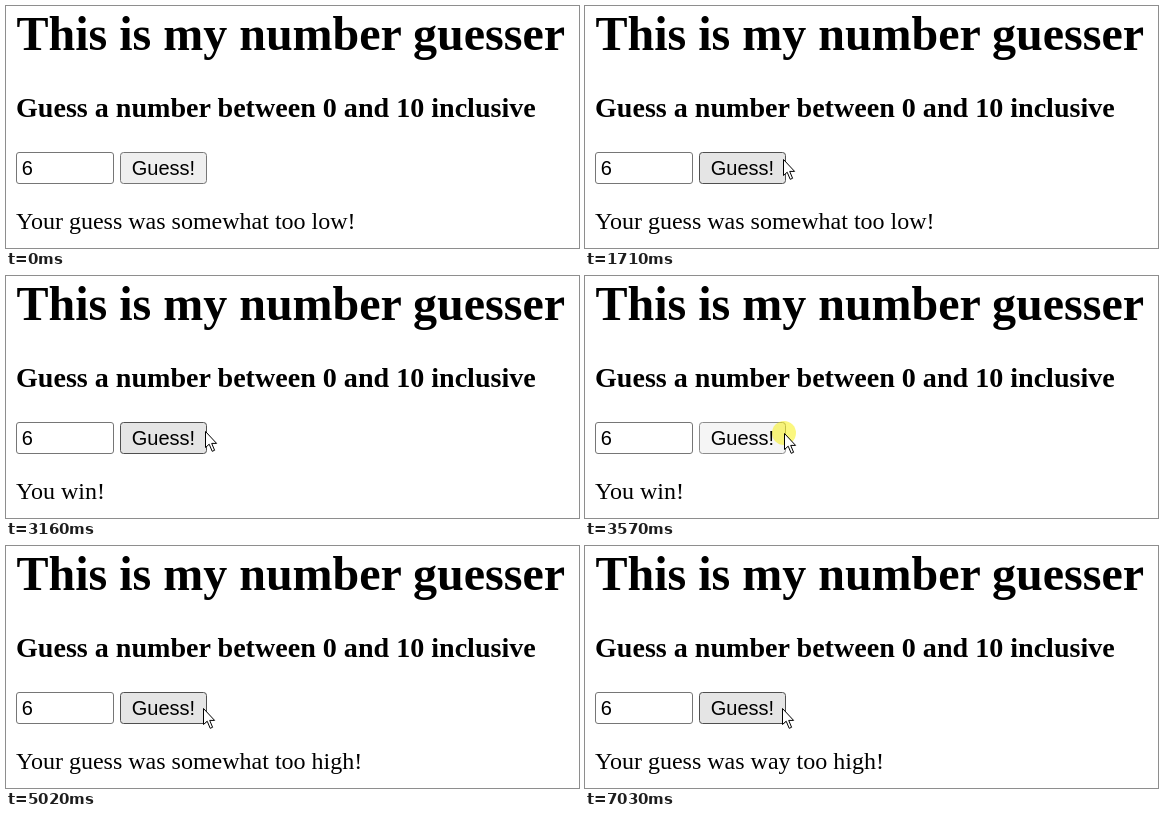
An HTML page for the animation above (8 s loop, 573 by 242 pixels).

```html
<!DOCTYPE html>
<html lang="en">
<head>
<meta charset="utf-8">
<title>Number guesser</title>
<style>
  html, body { margin: 0; width: 573px; height: 242px; overflow: hidden; background: #fff; }
  svg { display: block; }
  text { font-family: "Liberation Serif", "Times New Roman", serif; }
  .bold { font-weight: bold; }
  .ui { font: 20px "Liberation Sans", Arial, sans-serif; }
  #button { fill: #efefef; stroke: #767676; }
  #button.hover { fill: #e5e5e5; stroke: #4f4f4f; }
  #button.pressed { fill: #f5f5f5; stroke: #8d8d8d; }
</style>
</head>
<body>
<svg width="573" height="242">
  <text class="bold" x="10.5" y="44" font-size="48">This is my number guesser</text>
  <text class="bold" x="10" y="111" font-size="28.08">Guess a number between 0 and 10 inclusive</text>
  <rect x="10.5" y="146.5" width="97" height="31" rx="2.5" fill="#fff" stroke="#767676"/>
  <text class="ui" x="15.7" y="169">6</text>
  <rect id="button" x="114.5" y="146.5" width="86" height="31" rx="3"/>
  <text class="ui" x="157.5" y="169" text-anchor="middle">Guess!</text>
  <text id="message" x="10" y="223" font-size="24"></text>
  <g id="pointer">
    <circle id="halo" r="12" fill="#f8f000" fill-opacity=".5"/>
    <path d="M.5 .5V16.5L4.2 13.2L7.2 20.3L9.6 19.3L6.7 12.4H11.6Z" fill="#fff" stroke="#000"/>
  </g>
</svg>
<script>
const LOOP = 8000;
const STEP = 132; // the picture advances in ticks of this many ms
const LEAD = 8;
const $ = id => document.getElementById(id);

// Pointer stops: [tick, x, y].
const path = [
  [3, 496, 195], [8, 199, 155], [13, 198, 153], [23, 198, 153],
  [26, 199, 157], [32, 199, 157], [33, 197, 162]
];
const clicks = [15, 27, 37, 45];
const verdict = text => `Your guess was ${text}!`;
const messages = [
  [0, verdict("somewhat too low")],
  [16, "You win!"],
  [28, verdict("somewhat too high")],
  [46, verdict("somewhat too low")],
  [53, verdict("way too high")]
];

const easeOut = p => 1 - (1 - p) ** 2;

function pointerAt(tick) {
  const i = path.findLastIndex(([start]) => start <= tick);
  if (i < 0) return null;
  const [start, ...from] = path[i];
  const [end, ...to] = path[i + 1] ?? [Infinity, ...from];
  const k = easeOut((tick - start) / (end - start));
  return from.map((v, axis) => Math.round(v + (to[axis] - v) * k));
}

function draw(t) {
  const tick = Math.floor((t + LEAD) / STEP);
  const tip = pointerAt(tick);
  const clicking = clicks.includes(tick);
  const over = tip && tip[0] <= 200;

  $("pointer").style.display = tip ? "" : "none";
  if (tip) $("pointer").setAttribute("transform", `translate(${tip})`);
  $("halo").style.display = clicking ? "" : "none";
  $("button").setAttribute("class", clicking ? "pressed" : over ? "hover" : "");
  $("message").textContent = messages.findLast(([start]) => start <= tick)[1];
}

const begin = performance.now();
function tick() {
  draw((performance.now() - begin) % LOOP);
  requestAnimationFrame(tick);
}
tick();
</script>
</body>
</html>
```
